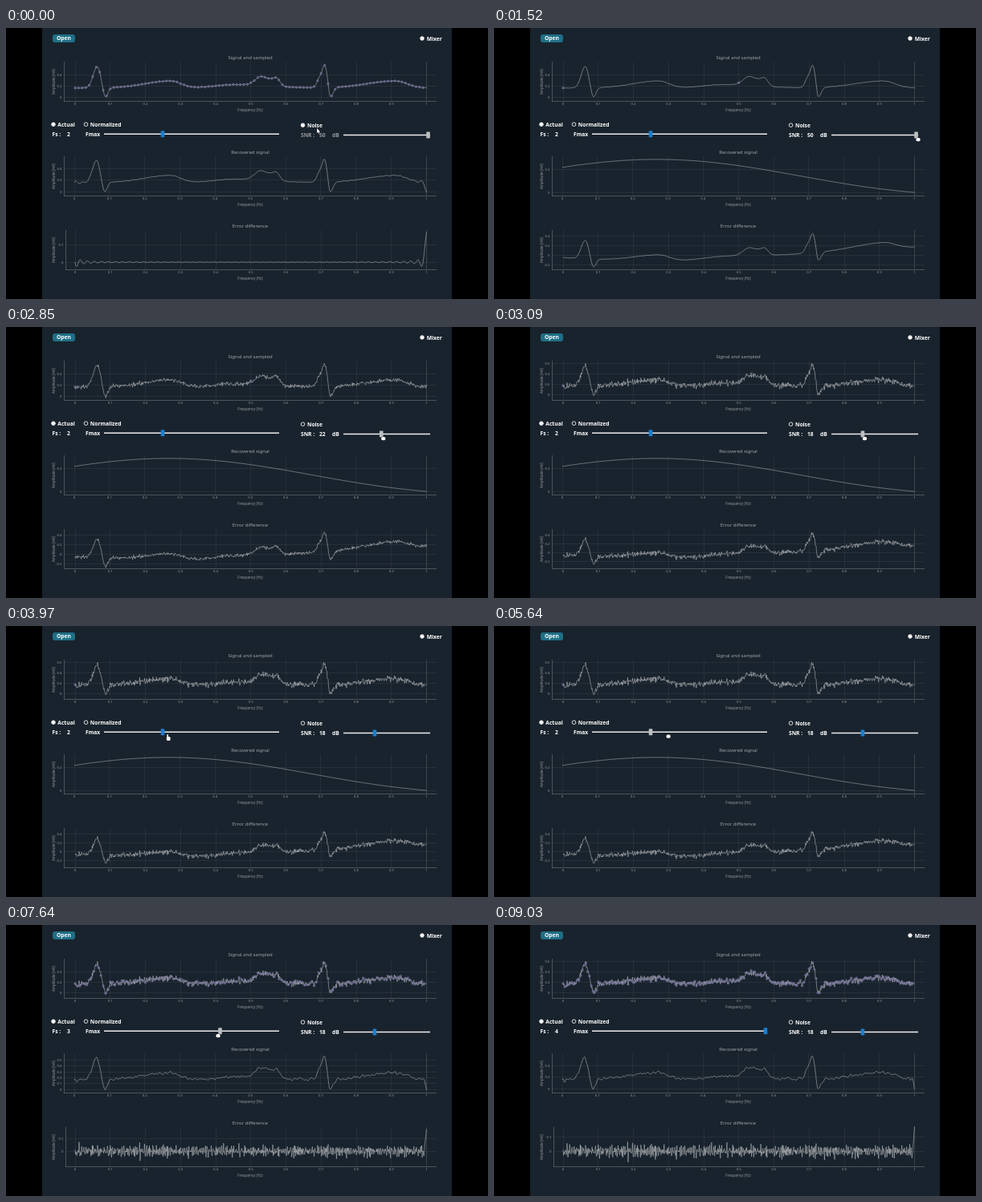
Animation of 600x338 px, one loop 9640 ms. Source, as an HTML page with a canvas:

```html
<!DOCTYPE html>
<html lang="en">
<head>
<meta charset="utf-8">
<title>Signal sampler</title>
<style>
html, body { margin: 0; width: 100%; height: 100%; overflow: hidden; background: #000; }
canvas { display: block; }
</style>
</head>
<body>
<canvas id="stage" width="600" height="338"></canvas>
<script>
const ctx = document.getElementById('stage').getContext('2d');
const LOOP = 9640, COUNT = 800;
const NOISE_ON = 300, RESAMPLE = 1500, FS3 = 6030, FS4 = 8060;
const DRAG_START = 1450, DRAG_END = 2960;
const BOLD = 'bold 6.7px "Noto Sans", "Open Sans", sans-serif';
const LABEL = '#969a9e';
const sans = size => `${size}px "Noto Sans", "Open Sans", sans-serif`;
const clamp = x => Math.min(1, Math.max(0, x));

// Heartbeat waves: centre px, height in mV, left and right width px
const WAVES = [
  [113.5, 0.38, 7, 6], [123.5, -0.18, 4, 4.5], [205, 0.125, 45, 18], [285, 0.06, 35, 60],
  [318, 0.16, 11, 12], [337, 0.14, 9, 6],
  [391, 0.18, 5, 5], [397, 0.35, 4, 4], [403.5, -0.18, 2.5, 5], [485, 0.125, 50, 20]
];
// Pointer moves: start, end, x, y
const MOVES = [
  [30, 300, 372, 121], [550, 850, 548, 134], [850, 1060, 528, 139], [3390, 3900, 202, 139],
  [4330, 5640, 217, 137.5], [5640, 5790, 232, 137.5], [5940, 6270, 264, 138],
  [7640, 8550, 311, 138], [8970, 9000, 549, 50]
];

const snrAt = t => Math.round(50 - 32 * clamp((t - DRAG_START) / (DRAG_END - DRAG_START)) ** 1.8);
const snrHandle = snr => 525.5 - (50 - snr) * 2.08;

const clean = Array.from({ length: COUNT + 1 }, (_, i) => {
  const t = i / COUNT, x = 86 + 437.5 * t;
  return WAVES.reduce((sum, [c, height, left, right]) =>
    sum + height * Math.exp(-(((x - c) / (x < c ? left : right)) ** 2)),
  0.16 + 0.003 * Math.sin(310 * t) * Math.sin(47 * t));
});

function gaussian(seed) {
  const next = () => (seed = (seed * 1664525 + 1013904223) >>> 0) / 2 ** 32;
  return () => (next() + next() + next() + next() - 2) * 1.73;
}

const sinc = x => Math.abs(x) < 1e-9 ? 1 : Math.sin(Math.PI * x) / (Math.PI * x);

// What the samples missing outside 0..1 would have added
function edgeError(t, n) {
  let sum = sinc(n * (1 - t));
  for (let j = 1; j < 60; j++) sum += sinc(n * (1 - t) + j) + sinc(n * t + j);
  return 0.17 * sum;
}

const cache = {};
function curves(snr, samples) {
  const key = snr + '/' + samples;
  if (cache[key]) return cache[key];
  const rnd = gaussian(snr * 7919 + 17);
  const sd = snr < 50 ? 0.22 * 10 ** (-snr / 20) : 0;
  const noise = clean.map(() => sd * rnd());
  const smooth = i => {
    let sum = 0;
    for (let d = -3; d <= 3; d++) sum += (noise[i + d] || 0) * (4 - Math.abs(d)) / 16;
    return sum;
  };
  const signal = clean.map((v, i) => v + noise[i]);
  const recovered = clean.map((v, i) => {
    const t = i / COUNT;
    return samples === 2
      ? 0.215 * sinc(2 * t) + 0.23 * sinc(2 * t - 1)
      : v + smooth(i) - edgeError(t, samples);
  });
  const error = signal.map((v, i) => v - recovered[i]);
  return cache[key] = { signal, recovered, error };
}

function text(str, x, y, font, color = '#fff', align = 'left') {
  ctx.font = font;
  ctx.fillStyle = color;
  ctx.textAlign = align;
  ctx.fillText(str, x, y);
}

function line(x1, y1, x2, y2, color, width = 1) {
  ctx.strokeStyle = color;
  ctx.lineWidth = width;
  ctx.beginPath();
  ctx.moveTo(x1, y1);
  ctx.lineTo(x2, y2);
  ctx.stroke();
}

function box(x, y, w, h, r, color) {
  ctx.fillStyle = color;
  ctx.beginPath();
  ctx.roundRect(x, y, w, h, r);
  ctx.fill();
}

function radio(x, y, filled, label, labelX) {
  ctx.beginPath();
  ctx.arc(x, y, 2.3, 0, 7);
  ctx.fillStyle = ctx.strokeStyle = '#f4f4f4';
  ctx.lineWidth = 0.9;
  ctx.stroke();
  if (filled) ctx.fill();
  text(label, labelX, y + 0.6, BOLD);
}

function slider(x1, x2, y, handle, active) {
  line(x1, y, x2, y, '#ececec', 1.5);
  box(handle - 2.3, y - 4, 4.6, 8, 0.6, active ? '#1a7fd0' : '#bcbfc2');
}

// zero: y of 0 mV, scale: px per mV
function plot({ title, top, left = 72, x0 = 86, zero, scale, ticks, data, samples }) {
  const bottom = top + 50, px = t => x0 + (523.5 - x0) * t, py = v => zero - scale * v;
  text(title, 304, top - 4.4, sans(6), '#a0a4a8', 'center');
  for (let i = 0; i <= 10; i++) {
    const x = Math.floor(px(i / 10)) + 0.5;
    line(x, top, x, bottom, `rgba(255,255,255,${i < 10 ? 0.06 : 0.14})`);
    text(i / 10, px(i / 10), bottom + 3, sans(4.3), LABEL, 'center');
  }
  for (const v of ticks) {
    const y = Math.floor(py(v)) + 0.5;
    line(left, y, 536, y, 'rgba(255,255,255,0.06)');
    text(v, left - 2.5, py(v) + 0.3, sans(4.3), LABEL, 'right');
  }
  line(left + 0.5, top, left + 0.5, bottom, '#596169', 0.8);
  line(left, bottom - 0.5, 536, bottom - 0.5, '#596169', 0.8);
  text('Frequency (Hz)', 304, bottom + 10.4, sans(4.5), LABEL, 'center');
  ctx.save();
  ctx.translate(60, top + 25);
  ctx.rotate(-Math.PI / 2);
  text('Amplitude (mV)', 0, 0, sans(4.4), LABEL, 'center');
  ctx.restore();

  ctx.strokeStyle = 'rgba(205,208,210,0.75)';
  ctx.lineWidth = 0.65;
  ctx.lineJoin = 'round';
  ctx.beginPath();
  data.forEach((v, i) => ctx.lineTo(px(i / COUNT), py(v)));
  ctx.stroke();
  if (!samples) return;
  ctx.strokeStyle = 'rgba(148,142,186,0.85)';
  ctx.fillStyle = 'rgba(100,100,140,0.6)';
  ctx.lineWidth = 0.6;
  for (let k = 0; k < samples; k++) {
    const t = k / samples;
    ctx.beginPath();
    ctx.arc(px(t), py(data[Math.round(t * COUNT)]), 1.25, 0, 7);
    ctx.fill();
    ctx.stroke();
  }
}

function pointerAt(t) {
  if (t >= DRAG_START && t < 3390) return [snrHandle(snrAt(t)) + 2.5, 139];
  let x = 387, y = 125;
  for (const [start, end, toX, toY] of MOVES) {
    const p = clamp((t - start) / (end - start));
    x += (toX - x) * p;
    y += (toY - y) * p;
    if (start === 850 && t >= 3390) x = snrHandle(18) + 2.5;
  }
  return [x, y];
}

function pointer(t) {
  if (t >= 9030) return;
  const dragging = (t > 1400 && t < 3390) || (t > 4600 && t < 8640);
  ctx.save();
  ctx.translate(...pointerAt(t));
  ctx.fillStyle = '#fff';
  ctx.strokeStyle = '#10161c';
  ctx.lineWidth = 0.6;
  ctx.beginPath();
  if (dragging) {
    ctx.roundRect(-2.6, -2.1, 5.2, 4.4, 1.9);
  } else if (t > 1000) {
    ctx.roundRect(-1.6, -4, 1.6, 5, 0.8);
    ctx.roundRect(-2.2, -1, 4.8, 5, 1.6);
  } else {
    [[0, 0], [0, 6], [1.4, 4.8], [2.4, 7], [3.3, 6.6], [2.4, 4.5], [4.2, 4.4]]
      .forEach(p => ctx.lineTo(...p));
    ctx.closePath();
  }
  ctx.stroke();
  ctx.fill();
  ctx.restore();
}

function draw(t) {
  const snr = snrAt(t);
  const fs = t < FS3 ? 2 : t < FS4 ? 3 : 4;
  const samples = t < RESAMPLE ? 100 : fs === 2 ? 2 : fs * 50;
  const { signal, recovered, error } = curves(snr, samples);
  const noisy = t >= NOISE_ON, loud = snr < 20;

  ctx.fillStyle = '#000';
  ctx.fillRect(0, 0, 600, 338);
  ctx.fillStyle = '#19232d';
  ctx.fillRect(45, 0, 510, 338);
  ctx.textBaseline = 'middle';

  box(58, 8, 28, 10, 3, '#1f6f86');
  text('Open', 72, 13.3, BOLD, '#fff', 'center');
  radio(518, 13, true, 'Mixer', 523.7);

  plot({
    title: 'Signal and sampled', top: 42, data: signal, samples,
    zero: loud ? 84.3 : 86, scale: loud ? 65.5 : 70,
    ticks: loud && fs !== 3 ? [0, 0.2, 0.4, 0.6] : [0, 0.2, 0.4]
  });
  plot({
    title: 'Recovered signal', top: 160, x0: 85, data: recovered,
    ...(samples === 2 ? { zero: 205, scale: 145, ticks: [0, 0.2] }
      : fs === 3 ? { zero: 205, scale: 73, ticks: [0, 0.1, 0.2, 0.3, 0.4, 0.5] }
      : { zero: 204.3, scale: 72, ticks: [0, 0.2, 0.4] })
  });
  plot({
    title: 'Error difference', top: 252, data: error,
    left: samples === 2 ? 72 : 74,
    ...(samples === 2
      ? { zero: loud ? 281.5 : 283, scale: loud ? 54 : 60, ticks: [-0.2, 0, 0.2, 0.4] }
      : { zero: fs > 2 ? 282 : 292, scale: [220, 160, 180][fs - 2], ticks: [0, 0.1] })
  });

  radio(59, 120.2, true, 'Actual', 64.3);
  radio(99.5, 120.2, false, 'Normalized', 104.8);
  text('Fs :', 57.5, 133.3, BOLD);
  text(fs, 76, 133.3, BOLD);
  text('Fmax', 99, 133.3, BOLD);
  slider(122, 340, 132.2, 195 + 71.5 * (fs - 2), t < 4600 || t >= 8640);

  radio(369.5, 121.2, !noisy, 'Noise', 375);
  const ink = noisy ? '#fff' : '#969b9f';
  text('SNR :', 367, 134.3, BOLD, ink);
  text(snr, 390, 134.3, BOLD, ink);
  text('dB', 406, 134.3, BOLD, ink);
  slider(420, 528, 133.4, snrHandle(snr), noisy && (t < 1000 || t >= 3420));
  pointer(t);
}

function frame() {
  draw(performance.now() % LOOP);
  requestAnimationFrame(frame);
}
frame();
</script>
</body>
</html>
```
